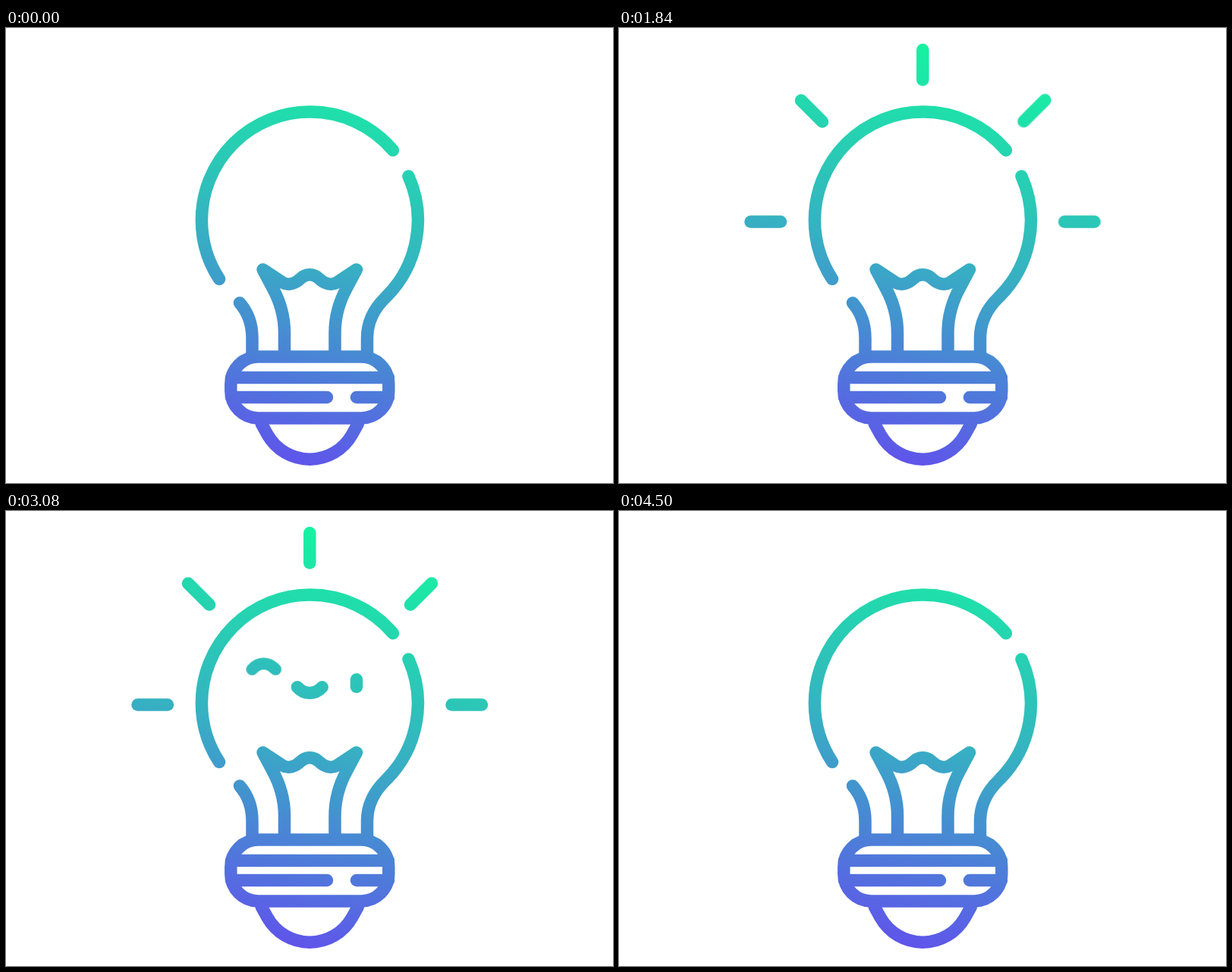
These frames come from a looping animation (800 by 600 pixels, 4.8 s). An HTML page without scripts:

```html
<!DOCTYPE html>
<html lang="en">
<head>
<meta charset="utf-8">
<title>Light bulb</title>
<style>
html, body { margin: 0; width: 100%; height: 100%; overflow: hidden; background: #fff; }
svg { display: block; width: 800px; height: 600px; }
.ink { fill: none; stroke: url(#tint); stroke-width: 16.5; stroke-linecap: round; stroke-linejoin: round; }

/* Parts fly in along (--x, --y), overshoot and settle */
.fly {
  animation: fly 4800ms var(--at) infinite both, show 4800ms linear var(--at) infinite both;
}
@keyframes fly {
  0% { transform: translate(calc(var(--x) * 60px), calc(var(--y) * 60px)); animation-timing-function: cubic-bezier(.45, .05, .5, .95); }
  6.5% { transform: translate(calc(var(--x) * -5px), calc(var(--y) * -5px)); animation-timing-function: ease-in-out; }
  10% { transform: translate(calc(var(--x) * 3.3px), calc(var(--y) * 3.3px)); animation-timing-function: ease-in-out; }
  13.3% { transform: translate(calc(var(--x) * -1.4px), calc(var(--y) * -1.4px)); animation-timing-function: ease-in-out; }
  16.7% { transform: translate(calc(var(--x) * .6px), calc(var(--y) * .6px)); animation-timing-function: ease-in-out; }
  20.8%, 100% { transform: translate(0, 0); }
}
@keyframes show {
  0% { opacity: 0; }
  4.2%, 79% { opacity: 1; }
  79.01%, 100% { opacity: 0; }
}

.rays { animation: rays 4800ms linear infinite; }
@keyframes rays {
  0%, 14.9% { opacity: 0; }
  14.91%, 83% { opacity: 1; }
  93.5%, 100% { opacity: 0; }
}
.face { animation: face 4800ms linear infinite; }
@keyframes face {
  0%, 39% { opacity: 0; }
  39.01%, 83% { opacity: 1; }
  93.5%, 100% { opacity: 0; }
}
.drop { animation: drop 4800ms ease-in infinite; }
@keyframes drop {
  0%, 83% { transform: translateY(0); }
  93.5%, 100% { transform: translateY(24px); }
}

.eye, .wink { transform-box: fill-box; transform-origin: center; }
.eye.left { animation: pop 4800ms ease-in-out infinite, blink 4800ms step-end infinite; }
.eye.right { animation: stare 4800ms ease-in-out infinite, open 4800ms step-end infinite; }
.wink { animation: wink 4800ms ease-in-out infinite, shut 4800ms step-end infinite; }
@keyframes pop {
  0%, 52.9% { transform: scale(0); }
  55.42% { transform: scale(.82); }
  57.5% { transform: scale(1.07); }
  59.4%, 100% { transform: scale(1); }
}
@keyframes stare {
  0%, 52.9% { transform: scale(0); }
  55.42% { transform: scale(.82); }
  57.5% { transform: scale(1.07); }
  59.4%, 60.4% { transform: scale(1); }
  62% { transform: scale(1.5); }
  63.8%, 100% { transform: scale(1); }
}
@keyframes wink {
  0%, 58.75% { transform: translateY(0) scale(.4); }
  60% { transform: translateY(0) scale(.9); }
  62.08% { transform: translateY(-29px) scale(1.24); }
  64.17% { transform: translateY(-20.5px) scale(.95); }
  67.1% { transform: translateY(0) scale(1); }
  69.2% { transform: translateY(-9px) scale(1.02); }
  71.2% { transform: translateY(0) scale(1); }
  72.5% { transform: translateY(-4px) scale(1); }
  74.5%, 100% { transform: translateY(0) scale(1); }
}
@keyframes blink { 0% { opacity: 0; } 52.9% { opacity: 1; } 58.75%, 100% { opacity: 0; } }
@keyframes open { 0% { opacity: 0; } 52.9%, 100% { opacity: 1; } }
@keyframes shut { 0% { opacity: 0; } 58.75%, 100% { opacity: 1; } }
</style>
</head>
<body>
<svg viewBox="0 0 800 600">
  <defs>
    <linearGradient id="tint" gradientUnits="userSpaceOnUse" x1="400" y1="21" x2="279" y2="549">
      <stop offset="0" stop-color="#16f2a1"/>
      <stop offset=".5" stop-color="#36b1c2"/>
      <stop offset="1" stop-color="#5f55ea"/>
    </linearGradient>
    <clipPath id="view"><rect x="164.5" y="18" width="471.5" height="563"/></clipPath>
  </defs>

  <g class="ink">
    <!-- glass -->
    <path d="M281 331A142.5 142.5 0 0 1 257.9 253A142.5 142.5 0 0 1 400.3 110.6A142.5 142.5 0 0 1 510 161.3"/>
    <path d="M530.5 195.5A142.5 142.5 0 0 1 500.5 355C485 370 476 388 476 409V430"/>
    <path d="M308 362.5C319 375 324.5 392 324.5 409V430"/>
    <!-- filament -->
    <path d="M367 430V402C367 380 361 360 351 342L338.5 318.5L365 336C371.5 339.5 381 337.5 388 330.5C395 323.5 405.6 323.5 412.6 330.5C419.6 337.5 429 339.5 435.6 336L462 318.5L449.5 342C439.5 360 433.5 380 433.5 402V430"/>
    <!-- socket -->
    <rect x="296.3" y="433.5" width="208" height="81" rx="36"/>
    <path d="M297 461H504M297 487H423M462 487H504"/>
    <path d="M336.5 521.5L344.5 536A64 64 0 0 0 456.1 536L464.1 521.5"/>
  </g>

  <g class="ink" clip-path="url(#view)">
    <g class="rays">
      <path class="fly" style="--x:-1;--y:0;--at:720ms" d="M173.5 255.5H213"/>
      <path class="fly" style="--x:-.707;--y:-.707;--at:820ms" d="M240 95.5L268 123.5"/>
      <path class="fly" style="--x:0;--y:-1;--at:920ms" d="M400.3 29V68.5"/>
      <path class="fly" style="--x:.707;--y:-.707;--at:1020ms" d="M561 95.5L533 123.5"/>
      <path class="fly" style="--x:1;--y:0;--at:1120ms" d="M587.5 255.5H627"/>
    </g>
    <g class="face">
      <g class="drop">
        <path class="fly" style="--x:0;--y:.73;--at:1920ms" d="M384 232.3C393 242.5 407.5 242.5 416.7 232.3"/>
      </g>
      <path class="eye left" d="M338.5 222.3V231.8"/>
      <path class="eye right" d="M462 222.3V231.8"/>
      <path class="wink" d="M323.5 229.5C333 218.8 346 218.8 356 229.5"/>
    </g>
  </g>
</svg>
</body>
</html>
```
